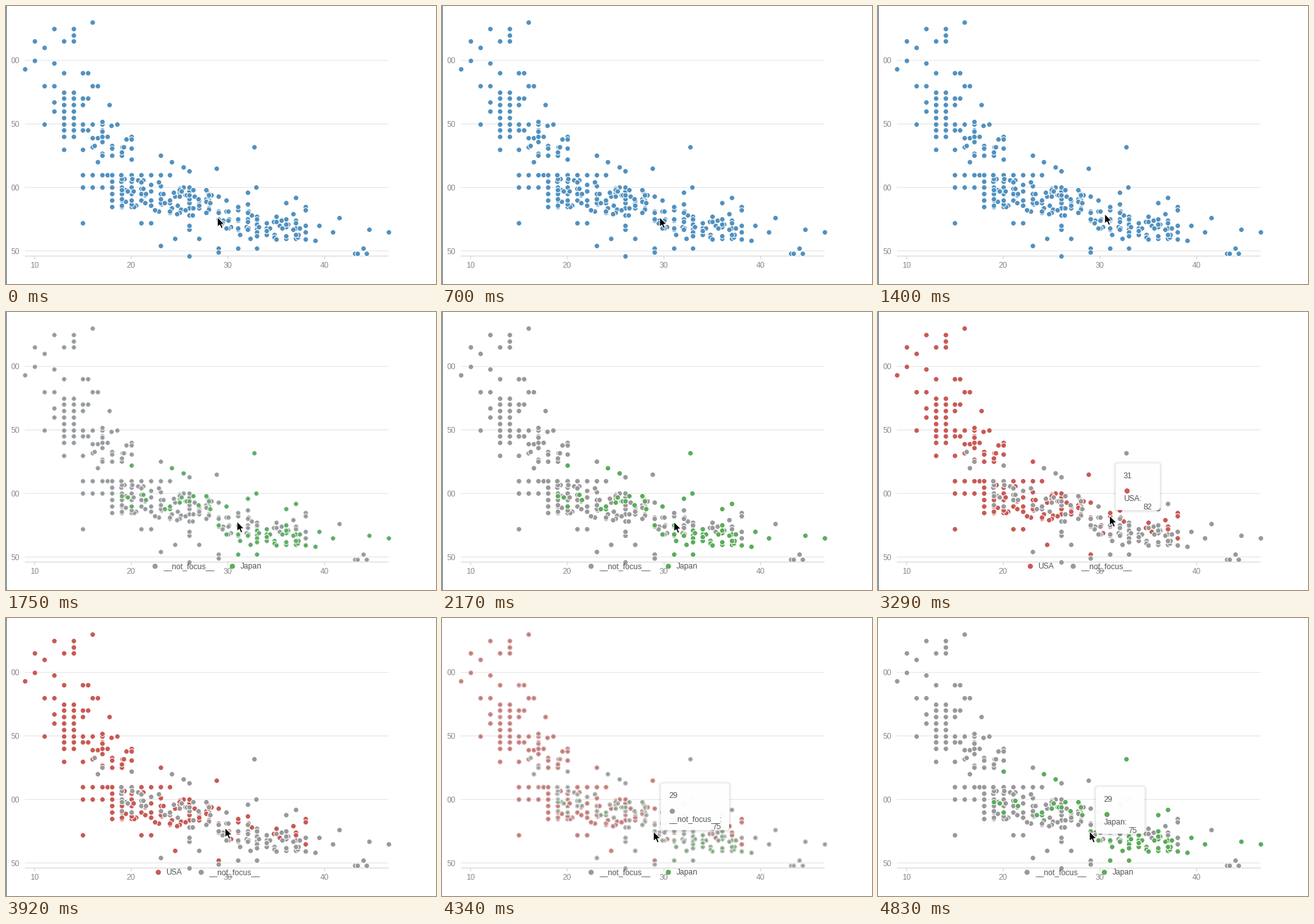
A matplotlib script that plays this animation: 662x428 px, repeating every 5.25 s.

```python
from itertools import product

import numpy as np
import matplotlib.pyplot as plt
from matplotlib.animation import FuncAnimation
from matplotlib.patches import FancyBboxPatch, Polygon

W, H, DPI = 662, 428, 100
STEP, FRAMES = 70, 75
PT = 72 / DPI

BLUE, RED, GREEN, GRAY = "#5191c0", "#c85a55", "#5cac5b", "#999999"
TEXT, TICK, GRID, AXIS = "#555555", "#8a8a8a", "#e2e2e2", "#cfcfcf"
OTHER = "__not_focus__"

plt.rcParams["font.family"] = "Liberation Sans"
plt.rcParams["font.size"] = 12 * PT

fig = plt.figure(figsize=(W / DPI, H / DPI), dpi=DPI, facecolor="white")
ax = fig.add_axes([0, 0, 1, 1])
ax.set(xlim=(0, W), ylim=(H, 0))
ax.axis("off")
rng = np.random.default_rng(7)


def px(mpg):
    return 44 + 14.89 * (np.asarray(mpg) - 10)


def py(hp):
    return 279.3 - 1.955 * (np.asarray(hp) - 100)


def grid(mpgs, hps):
    return list(product(mpgs, hps))


def fives(lo, hi):
    return range(lo, hi + 1, 5)


def cloud(n, start, end, spread):
    """Points along a falling line; half of them sit on whole mpg values."""
    mpg = rng.uniform(start[0], end[0], n)
    mpg = np.where(rng.random(n) < 0.5, mpg.round(), mpg.round(1))
    hp = np.interp(mpg, *zip(start, end)) + rng.uniform(-spread, spread, n)
    return list(zip(mpg, hp.round()))


# (mpg, horsepower) for each region
usa = (
    grid([10], [200, 215]) + grid([11], range(150, 211, 30))
    + grid([12], [160, 167, 180, 198, 225]) + grid([13], fives(150, 175))
    + grid([13, 14], [140, 145, 215]) + grid([14], fives(150, 175))
    + grid([13, 15], [130, 165, 190]) + grid([14], [220, 225])
    + grid([15, 15.5], [145, 170, 190]) + grid([15, 16, 17], [100, 110, 150])
    + grid([16, 16.5], [139, 180]) + grid([17, 17.5], [110, 140])
    + grid([18, 19, 20], fives(85, 110)) + grid(range(21, 25), [90, 110])
    + grid([15, 21, 22], [72]) + grid([26, 27, 28], [84, 88, 90])
    + [(9, 193), (16, 230), (17.7, 165), (23, 125), (28.8, 115), (24.5, 60),
       (29, 52), (31, 82), (31, 85), (38, 85)]
    + cloud(20, (16, 145), (20, 128), 16)
    + cloud(50, (19, 97), (29, 86), 12)
    + cloud(14, (29, 78), (39, 74), 12)
)
europe = (
    grid([26], [46, 67, 70, 78, 91, 113]) + grid([43.1, 43.4, 44.3], [48])
    + [(16.2, 133), (16.5, 120), (17, 125), (23, 54), (44, 52), (41.5, 76),
       (29, 49), (27, 60)]
    + cloud(22, (18, 104), (29, 80), 12)
    + cloud(20, (29, 74), (33, 72), 8)
    + cloud(4, (33, 70), (38, 66), 8)
)
japan = (
    grid([31, 33], [52]) + grid([29, 31, 36], [75])
    + [(20, 122), (24.2, 120), (25.4, 116), (32.7, 132), (32.9, 100),
       (32, 96), (29.8, 90), (36, 88), (37, 92), (39.4, 70), (40.8, 65),
       (44.6, 67), (46.6, 65)]
    + cloud(18, (18, 97), (28.5, 92), 7)
    + cloud(40, (29.5, 69), (39, 63), 7)
)


def label(x, y, s, color=TEXT, ha="left", z=2):
    return ax.text(x, y + 4.3, s, color=color, ha=ha, va="baseline", zorder=z)


def line(xs, ys, color, z=1):
    return ax.plot(xs, ys, color=color, lw=PT, zorder=z, snap=False,
                   solid_capstyle="butt")[0]


# Left edge, grid and axis
edge = line([0.5, 0.5], [0, H], "#3f6384", z=0)
for hp in (200, 150, 100, 50):
    line([29, 589], [py(hp)] * 2, GRID)
    label(21, py(hp) + 0.3, "00" if hp % 100 == 0 else "50", TICK, "right")
line([29, 589], [385, 385], AXIS)
for mpg in (10, 20, 30, 40):
    line([px(mpg)] * 2, [385, 390], AXIS)
    label(px(mpg) - 0.4, 399, str(mpg), TICK, "center")


def dot_size(diameter):
    return (diameter * PT) ** 2


def dots(points, z):
    mpg, hp = np.array(points).T
    return ax.scatter(px(mpg), py(hp), s=dot_size(8), c=BLUE,
                      edgecolors="white", linewidths=PT, zorder=z)


series = (usa, europe, japan)
old_dots = [dots(s, 3) for s in series]
new_dots = [dots(s, 4) for s in series]


def legend(items):
    parts = []
    for x, color, name in items:
        parts.append(ax.scatter([x], [391], s=dot_size(8), c=color,
                                linewidths=0, zorder=5))
        parts.append(label(x + 13, 391, name, z=5))
    return parts


usa_legend = legend([(233.5, RED, "USA"), (299.5, GRAY, OTHER)])
japan_legend = legend([(229, GRAY, OTHER), (348, GREEN, "Japan")])

# First frame, length of the change, colours of each series, legend
JAPAN_FOCUS = (GRAY, GRAY, GREEN)
PHASES = [(0, 1, (BLUE, BLUE, BLUE), []),
          (21, 6, JAPAN_FOCUS, japan_legend),
          (39, 8, (RED, GRAY, GRAY), usa_legend),
          (62, 8, JAPAN_FOCUS, japan_legend)]


class Tooltip:
    WIDTH = {OTHER: 105, "USA": 68, "Japan": 75}
    COLOR = {OTHER: GRAY, "USA": RED, "Japan": GREEN}
    HEIGHT = 72

    def __init__(self):
        self.shadows = [self.box("black", grow, 6) for grow in (1, 2, 3, 4)]
        self.body = self.box("white", 0, 7)
        self.dot = ax.scatter([0], [0], s=dot_size(8), linewidths=0, zorder=8)
        self.title, self.name = label(0, 0, "", z=8), label(0, 0, "", z=8)
        self.value = label(0, 0, "", ha="right", z=8)

    @staticmethod
    def box(color, grow, z):
        style = f"round,pad={grow},rounding_size={4 + grow}"
        return ax.add_patch(FancyBboxPatch((0, 0), 1, 1, boxstyle=style,
                                           fc=color, ec="none", zorder=z))

    def show(self, x, y, mpg, name, hp, alpha):
        w = self.WIDTH[name]
        for s in self.shadows:
            s.set_bounds(x, y + 0.5, w, self.HEIGHT)
            s.set_alpha(0.022 * alpha)
        self.body.set_bounds(x, y, w, self.HEIGHT)
        self.body.set_alpha(0.97 * alpha)
        self.dot.set_offsets([(x + 16.5, y + 42)])
        self.dot.set_facecolor(self.COLOR[name])
        self.dot.set_alpha(alpha)
        for text, s, dx, dy in ((self.title, str(mpg), 12, 18.5),
                                (self.name, name + ":", 12, 54),
                                (self.value, str(hp), w - 12, 66.5)):
            text.set_text(s)
            text.set_position((x + dx, y + dy + 4.3))
            text.set_alpha(alpha)


tooltip = Tooltip()
# First frame, last frame, x, y, mpg, name, hp
TIPS = [(35, 38, 364, 251, 31, "Japan", 75),
        (39, 41, 367, 249, 31, OTHER, 82),
        (42, 55, 366, 233, 31, "USA", 82),
        (60, 64, 337, 254.5, 29, OTHER, 75),
        (65, 74, 335.5, 260, 29, "Japan", 75)]


def tip_alpha(i):
    fade_in, fade_out = (i - 34) / 3, (55 - i) / 4
    return min(1, fade_in, fade_out) if i <= 55 else 1


ARROW = np.array([(0, 0), (0, 15), (3.5, 12), (6, 17.5),
                  (8.6, 16.4), (6.3, 11), (11, 11)])
cursor = ax.add_patch(Polygon(ARROW, fc="black", ec="white", lw=1.1 * PT,
                              joinstyle="miter", zorder=10))
# Time, x and y of the pointer's tip
PATH = np.transpose([(0, 325.5, 325), (700, 335, 325), (1120, 349, 320),
                     (1400, 349, 320), (1820, 357, 323), (2380, 357, 323),
                     (2590, 356.5, 317), (3220, 356.5, 313.5),
                     (3570, 356.5, 313.5), (4130, 325.5, 328.5)])


def draw(i):
    n = max(k for k, phase in enumerate(PHASES) if i >= phase[0])
    start, length, colors, shown = PHASES[n]
    before = PHASES[max(n - 1, 0)][2]
    p = min(1, (i - start + 1) / length)
    for old, new, c0, c1 in zip(old_dots, new_dots, before, colors):
        old.set_facecolor(c0)
        old.set_alpha(1 - 0.3 * p)
        old.set_visible(p < 1)
        new.set_facecolor(c1)
        new.set_sizes([dot_size(8 * (0.6 + 0.4 * p))])
        new.set_alpha(0.35 + 0.65 * p)

    for part in usa_legend + japan_legend:
        part.set_visible(part in shown)
    edge.set_visible(n < len(PHASES) - 1)

    tip = next((t for t in TIPS if t[0] <= i <= t[1]), None)
    if tip:
        tooltip.show(*tip[2:], tip_alpha(i))
    else:
        tooltip.show(0, 0, 0, OTHER, 0, 0)

    times, xs, ys = PATH
    t = i * STEP
    cursor.set_xy(ARROW + [np.interp(t, times, xs), np.interp(t, times, ys)])
    return []


anim = FuncAnimation(fig, draw, frames=FRAMES, interval=STEP, repeat=True,
                     repeat_delay=0, init_func=lambda: draw(0))
plt.show()
```
